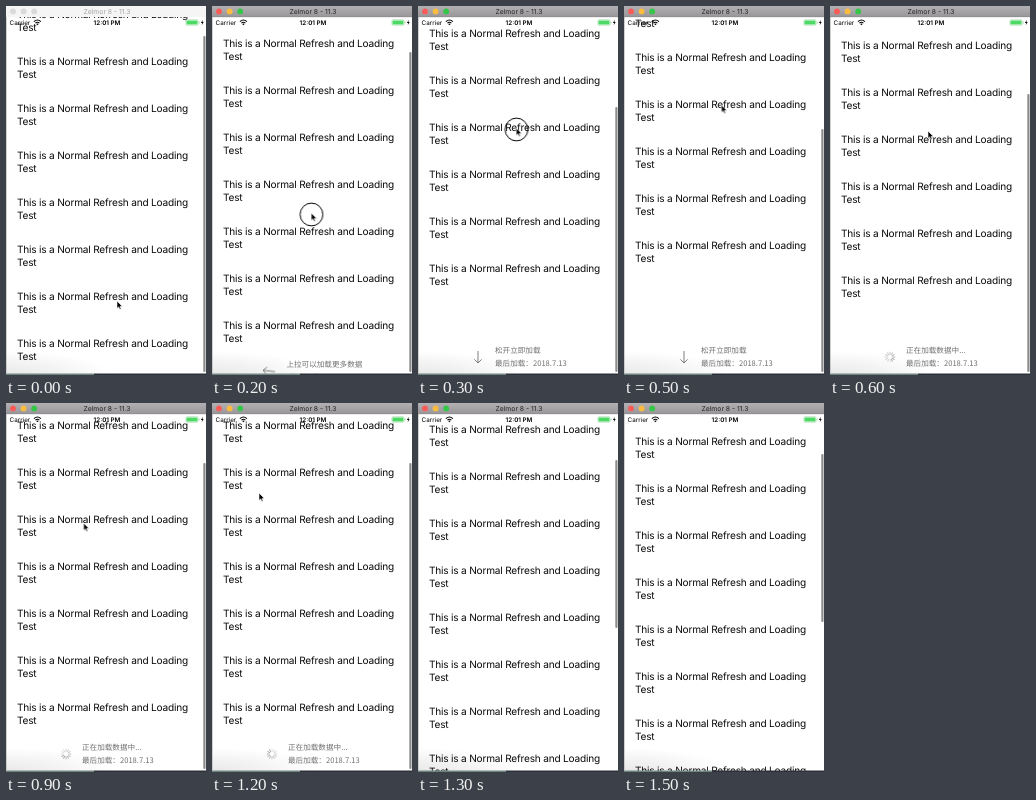
Recreate the animation shown at these times as an HTML page. Size 200 by 369 pixels, loop 2 s.

```html
<!DOCTYPE html>
<html lang="en">
<head>
<meta charset="utf-8">
<title>Pull up to load</title>
<style>
  html, body { margin: 0; width: 100%; height: 100%; overflow: hidden; background: #fff; }
  svg { display: block; width: 100%; height: 100%; }
  text { font-family: Inter, "Open Sans", sans-serif; text-rendering: geometricPrecision; white-space: pre; }
  .row text { font-size: 10.1px; letter-spacing: -.02em; fill: #0a0a0a; }
  .status text { font-size: 6.3px; }
  .title { font-size: 6.8px; text-anchor: middle; }
  .foot text { font: 7.6px "Noto Sans CJK SC", "Noto Sans CJK", sans-serif; fill: #707070; }

  /* one step is 5% = 100 ms */
  .anim { animation: 2s step-end infinite; }
  #list { animation-name: scroll; }
  #thumb { animation-name: thumb; }
  #extra { animation-name: loaded; }
  #active { animation-name: activate; }
  #pointer { animation-name: point; }
  #ring { animation-name: press; }
  #foot { animation-name: foot; }
  #arrow { animation-name: arrow; }
  #pull { animation-name: pull; }
  #release { animation-name: release; }
  #loading { animation-name: loading; }
  #spin { animation-name: spin; animation-timing-function: steps(20); }

  @keyframes scroll {
    0% { transform: translateY(338px); }
    5% { transform: translateY(333px); }
    10% { transform: translateY(320.3px); }
    15% { transform: translateY(263px); }
    20% { transform: translateY(241px); }
    25% { transform: translateY(239.7px); }
    30% { transform: translateY(275px); }
    35% { transform: translateY(300.3px); }
    40% { transform: translateY(304.5px); }
    45%, 60% { transform: translateY(305.3px); }
    65% { transform: translateY(309px); }
    70% { transform: translateY(318px); }
    75%, 100% { transform: translateY(320.5px); }
  }
  @keyframes thumb {
    0% { y: 30px; height: 336px; }
    5% { y: 34px; height: 332px; }
    10% { y: 46px; height: 320px; }
    15% { y: 101px; height: 265px; }
    20% { y: 121px; height: 245px; }
    25% { y: 123px; height: 243px; }
    30% { y: 88px; height: 278px; }
    35% { y: 65px; height: 301px; }
    40% { y: 61px; height: 305px; }
    45%, 60% { y: 60px; height: 306px; }
    65% { y: 57px; height: 168px; }
    70% { y: 52px; height: 168px; }
    75%, 100% { y: 51px; height: 168px; }
  }
  @keyframes point {
    0% { transform: translate(111px, 295px); opacity: 1; }
    5% { transform: translate(100px, 236px); }
    10% { transform: translate(99.3px, 207px); }
    15% { transform: translate(98.3px, 122px); }
    20% { transform: translate(98px, 101px); }
    25% { transform: translate(97.5px, 99px); }
    30% { transform: translate(98px, 125px); }
    35% { transform: translate(98px, 140px); animation-timing-function: steps(5); }
    60% { transform: translate(47px, 90px); opacity: 1; }
    65%, 100% { transform: translate(47px, 90px); opacity: 0; }
  }
  @keyframes press { 0% { opacity: 0; } 5% { opacity: 1; } 25%, 100% { opacity: 0; } }
  @keyframes activate { 0% { opacity: 0; } 5%, 100% { opacity: 1; } }
  @keyframes loaded { 0% { opacity: 0; } 65%, 100% { opacity: 1; } }
  @keyframes foot {
    0% { transform: none; opacity: 0; }
    10% { transform: translateY(14px); opacity: 1; }
    15% { transform: none; opacity: 1; }
    65%, 100% { transform: none; opacity: 0; }
  }
  @keyframes arrow {
    0% { transform: translate(60px, 351px) rotate(180deg); opacity: 1; }
    10% { transform: translate(57px, 351px) rotate(97deg); opacity: 1; }
    15% { transform: translate(60px, 351px); opacity: 1; }
    30%, 100% { transform: translate(60px, 351px); opacity: 0; }
  }
  @keyframes pull { 0% { opacity: 1; } 15%, 100% { opacity: 0; } }
  @keyframes release { 0% { opacity: 0; } 15% { opacity: 1; } 30%, 100% { opacity: 0; } }
  @keyframes loading { 0% { opacity: 0; } 30%, 100% { opacity: 1; } }
  @keyframes spin { from { transform: rotate(0deg); } to { transform: rotate(600deg); } }
</style>
</head>
<body>
<svg viewBox="0 0 200 369" preserveAspectRatio="none">
  <defs>
    <linearGradient id="bar" x2="0" y2="1">
      <stop stop-color="#b2b0b2"/><stop offset="1" stop-color="#989698"/>
    </linearGradient>
    <radialGradient id="shade" cx="0" cy="1" r="1">
      <stop stop-color="#e9e9e9"/><stop offset=".5" stop-color="#f3f3f3"/><stop offset="1" stop-color="#fff"/>
    </radialGradient>
    <clipPath id="screen"><path d="M0 11H200V367.5H0Z"/></clipPath>
    <g id="row" class="row">
      <text x="11" y="3.1">This is a Normal Refresh and Loading</text>
      <text x="11" y="16">Test</text>
    </g>
  </defs>

  <rect width="200" height="369" fill="#fff"/>
  <rect y="345" width="105" height="23" fill="url(#shade)"/>

  <g clip-path="url(#screen)">
    <g id="list" class="anim"></g>
    <g id="foot" class="foot anim">
      <path id="arrow" class="anim" d="M0-6V6M-3.6 2.4L0 6L3.6 2.4" fill="none" stroke="#707070" stroke-width=".9"/>
      <g id="pull" class="anim">
        <text x="74.4" y="346.8">上拉可以加载更多数据</text>
        <text x="77" y="360.2">最后加载：2018.7.13</text>
      </g>
      <g id="release" class="anim">
        <text x="77" y="346.8">松开立即加载</text>
        <text x="77" y="360.2">最后加载：2018.7.13</text>
      </g>
      <g id="loading" class="anim">
        <text x="76" y="346.8">正在加载数据中...</text>
        <text x="76" y="360.2">最后加载：2018.7.13</text>
        <g transform="translate(60 351)"><g id="spin" class="anim"></g></g>
      </g>
    </g>
    <rect id="thumb" class="anim" x="197.3" width="2.2" rx="1" fill="#8c8c8c"/>

    <g class="status">
      <text x="3.6" y="18.7">Carrier</text>
      <path d="M27.9 15.6Q31.4 12.4 34.9 15.6M29.4 17.1Q31.4 15.3 33.4 17.1" fill="none" stroke="#000" stroke-width="1.1"/>
      <path d="M30.2 17.9Q31.4 16.9 32.6 17.9L31.4 19.2Z"/>
      <text x="101" y="18.7" text-anchor="middle" font-weight="600">12:01 PM</text>
      <rect x="179.8" y="13.7" width="12.4" height="5.6" rx="1.3" fill="#fff" stroke="#8fcf98" stroke-width=".5"/>
      <rect x="180.5" y="14.4" width="11" height="4.2" rx=".7" fill="#4cd964"/>
      <rect x="192.8" y="15.5" width=".8" height="2" rx=".4" fill="#8fcf98"/>
      <path d="M196.8 13.8L194.9 16.9H196.2L195.7 19.3L197.7 16.1H196.4Z"/>
    </g>
  </g>

  <g>
    <rect width="200" height="11" fill="#f5f5f5"/>
    <g fill="#dadada"><circle cx="7" cy="5.4" r="2.9"/><circle cx="17.6" cy="5.4" r="2.9"/><circle cx="28.2" cy="5.4" r="2.9"/></g>
    <text class="title" x="101" y="7.8" fill="#a6a6a6">Zelmor 8 - 11.3</text>
  </g>
  <path d="M0 11V367" stroke="#bdbdbd" stroke-width="1.4"/>
  <path d="M0 368.2H88" stroke="#6f8381" stroke-width="1.6"/>
  <path d="M88 368.2H200" stroke="#2c3138" stroke-width="1.6"/>
  <g id="active" class="anim">
    <rect width="200" height="11" fill="url(#bar)"/>
    <path d="M0 10.8H200" stroke="#858385" stroke-width=".5"/>
    <circle cx="7" cy="5.4" r="2.9" fill="#fc5b57"/>
    <circle cx="17.6" cy="5.4" r="2.9" fill="#fdbb3f"/>
    <circle cx="28.2" cy="5.4" r="2.9" fill="#34c648"/>
    <text class="title" x="101" y="7.8" fill="#262626">Zelmor 8 - 11.3</text>
  </g>

  <g id="pointer" class="anim">
    <circle id="ring" class="anim" cx=".2" cy="1.5" r="11.4" fill="none" stroke="#000"/>
    <path d="M0 0V7.4L1.7 5.9L2.9 8.6L4.1 8.1L3 5.4H5.3Z" stroke="#fff" stroke-width=".6"/>
  </g>
</svg>
<script>
  const add = (parent, tag, attrs) => {
    const el = document.createElementNS("http://www.w3.org/2000/svg", tag);
    for (const key in attrs) el.setAttribute(key, attrs[key]);
    return document.getElementById(parent).appendChild(el);
  };

  for (let i = 0; i < 8; i++) add("list", "use", { href: "#row", y: -47 * i });
  add("list", "use", { href: "#row", y: 47, id: "extra", class: "anim" });

  for (let i = 0; i < 12; i++) {
    add("spin", "path", {
      d: "M0-2.6V-4.9", stroke: "#777", "stroke-width": 1, "stroke-linecap": "round",
      opacity: 0.2 + 0.4 * i / 11, transform: `rotate(${30 * i})`
    });
  }
</script>
</body>
</html>
```
